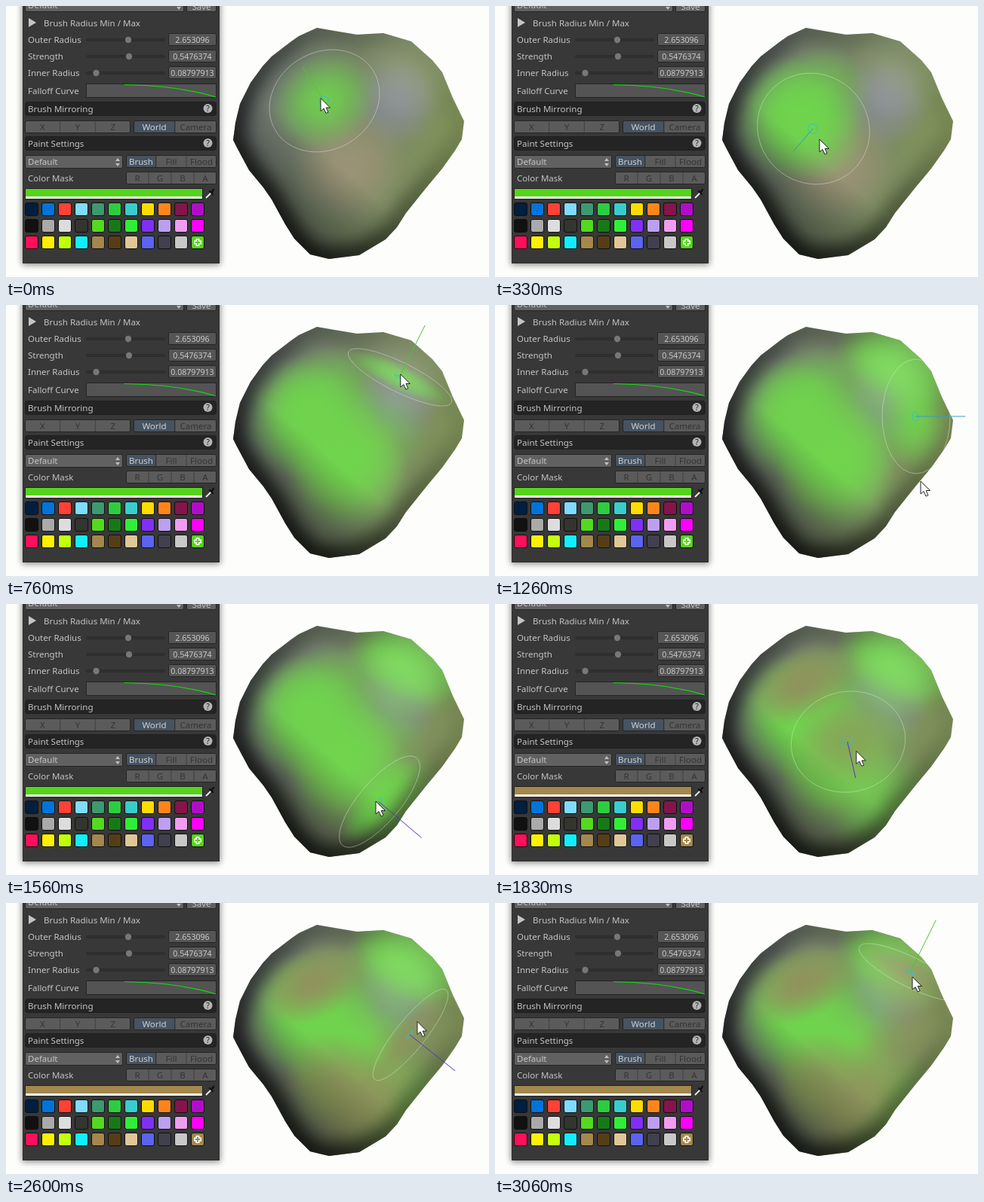
Recreate the animation shown at these times as an HTML page with a canvas. Size 640 by 360 pixels, loop 3100 ms.

```html
<!DOCTYPE html>
<html lang="en">
<head>
<meta charset="utf-8">
<title>Vertex painting</title>
<style>
html, body { margin: 0; width: 100%; height: 100%; overflow: hidden; background: #fdfdfc; }
svg, canvas { position: absolute; left: 0; top: 0; }
text { font-family: "Noto Sans", "Open Sans", sans-serif; }
</style>
</head>
<body>
<svg id="panel" width="640" height="360"></svg>
<canvas id="stage" width="640" height="360"></canvas>
<script>
const panel = document.getElementById('panel');
const ctx = document.getElementById('stage').getContext('2d');

// ---- Settings panel ----
const box = (x, y, w, h, fill, r = 2, stroke = '#252525') =>
  `<rect x="${x + .5}" y="${y + .5}" width="${w - 1}" height="${h - 1}" rx="${r}" fill="${fill}" stroke="${stroke}"/>`;
const text = (x, y, s, fill = '#c4c4c4', anchor = 'start', size = 11.5) =>
  `<text x="${x}" y="${y}" text-anchor="${anchor}" fill="${fill}" font-size="${size}">${s}</text>`;
const path = (d, attrs) => `<path d="${d}" ${attrs}/>`;

function tabs(x, y, w, names, active = -1) {
  const step = w / names.length;
  return box(x, y, w, 17, '#5b5b5b') + names.map((name, i) => {
    const left = x + i * step, on = i === active;
    return (on ? box(left, y, step, 17, '#465361') : '') +
      (i ? path(`M${left} ${y + 1}v15`, 'stroke="#414141"') : '') +
      text(left + step / 2, y + 12.5, name, on ? '#d0d0d0' : '#343434', 'middle');
  }).join('');
}

const header = (y, name) => box(25, y, 254, 19, '#242424', 3, '#202020') + text(29, y + 14, name) +
  `<circle cx="267.5" cy="${y + 9}" r="6" fill="#b4b4b4"/>` + text(267.5, y + 13, '?', '#222', 'middle', 10.5);

const slider = (y, name, knob, value) => text(29, y + 4, name) +
  box(106, y - 2, 105, 4, '#303030', 2, '#2c2c2c') + `<circle cx="${knob}" cy="${y}" r="4.2" fill="#777"/>` +
  box(215, y - 9, 64, 17, '#555') + text(247, y + 4, value, '#c8c8c8', 'middle', 10.6);

const dropdown = (x, y, w) => box(x, y, w, 18, '#616161') + text(x + 4, y + 13, 'Default') +
  path(`M${x + w - 10} ${y + 8}l3-4 3 4zm0 3l3 4 3-4z`, 'fill="#c0c0c0"');

const swatches = [
  '#001f3f #0074d9 #ff4136 #7fdbff #3d9970 #2ecc40 #39cccc #ffdc00 #ff851b #85144b #b10dc9',
  '#111 #aaa #ddd #33352f #55d820 #187818 #30ee38 #8030f5 #bd9ff0 #f09cf0 #f0f',
  '#ff0f5c #fff000 #c2ff0c #10efff #a3874d #553e17 #dfc797 #5b63f0 #40404f #c8c8c8 var(--paint)'
].map((row, j) => row.split(' ').map((c, i) => box(25 + 22 * i, 261 + 22 * j, 18, 18, c, 2.5, '#101010')).join('')).join('');

panel.innerHTML = `
<defs><filter id="soft" x="-10%" y="-10%" width="120%" height="120%"><feGaussianBlur stdDeviation="4"/></filter></defs>
<rect x="21" y="-10" width="263" height="354" opacity=".45" filter="url(#soft)"/>
${box(22, -5, 261, 347, '#383838', 0, '#2e2e2e')}
${dropdown(25, -10, 211)}
${box(239, -10, 40, 18, '#616161')}
${text(259, 5, 'Save', '#c4c4c4', 'middle')}
${path('M30 16l10 6-10 6z', 'fill="#c4c4c4"')}
${text(50, 26.5, 'Brush Radius Min / Max')}
${slider(45, 'Outer Radius', 162, '2.653096')}
${slider(67, 'Strength', 163, '0.5476374')}
${slider(89, 'Inner Radius', 119.5, '0.08797913')}
${text(29, 117, 'Falloff Curve')}
${box(106, 103, 173, 19, '#545454', 0)}
${path('M157 104.5C205 105 245 111 278 121', 'fill="none" stroke="#0be00b" stroke-width="1.2"')}
${header(127, 'Brush Mirroring')}
${tabs(25, 152, 140, ['X', 'Y', 'Z'])}
${tabs(169, 152, 110, ['World', 'Camera'], 0)}
${header(173, 'Paint Settings')}
${dropdown(25, 198, 130)}
${tabs(159, 198, 120, ['Brush', 'Fill', 'Flood'], 0)}
${text(29, 232.5, 'Color Mask')}
${tabs(159, 220, 120, ['R', 'G', 'B', 'A'])}
<rect x="25" y="242" width="236" height="15" fill="#222"/>
<rect x="26" y="243" width="234" height="10" fill="var(--paint)"/>
<rect x="26" y="253" width="234" height="3" fill="#fff"/>
${path('M265 255l7-7', 'stroke="#eee" stroke-width="1.8"')}
${path('M270 246l4 4M272 248l3-4', 'stroke="#111" stroke-width="2.4" stroke-linecap="round"')}
${swatches}
${path('M254 309v10M249 314h10', 'stroke="#fff" stroke-width="5"')}
${path('M254 310.5v7M250.5 314h7', 'stroke="var(--paint)" stroke-width="2"')}`;

// ---- Brush ----
// Each pass is a route of [step, x, y, paint left there].
const passes = [
  { swatch: '#55d41c', paint: '#6fd64c', preview: .85, route: [
    [0, 421, 126, .7], [4, 405, 112, .2], [7, 386, 150, .8], [10, 421, 163, .7], [13, 448, 205, .85],
    [16, 455, 232, .7], [20, 480, 175, .6], [23, 521, 96, .6], [28, 530, 76, .95], [33, 548, 82, .3],
    [38, 557, 148, 0], [39, 564, 234, 0], [43, 510, 265, .6], [48, 490, 262, 0]] },
  { swatch: '#a3874d', paint: '#91905d', preview: .65, route: [
    [51, 408, 105, .95], [55, 467, 183, 0], [60, 526, 245, 0], [66, 483, 275, .8], [71, 440, 242, .85],
    [76, 515, 210, .5], [80, 555, 140, .35], [83, 548, 95, .4], [92, 550, 92, 0], [93, 553, 98, 0]] }
];
const RADIUS = 76;
const clamp = (v, lo, hi) => Math.min(hi, Math.max(lo, v));

function locate(route, step) {
  const i = route.findIndex(k => k[0] > step);
  if (i < 0) return route[route.length - 1].slice(1, 3);
  const [s0, x0, y0] = route[i - 1], [s1, x1, y1] = route[i], k = (step - s0) / (s1 - s0);
  return [x0 + (x1 - x0) * k, y0 + (y1 - y0) * k];
}

// Projected surface normal of the rock, and the tilted disc lying on it
function surface(x, y) {
  const ny = clamp(2 * (y - 148), -69, 48);
  const reach = Math.sqrt(77 ** 2 - ny ** 2);
  const nx = clamp((x - 455) * (.65 + .007 * Math.abs(y - 148)), -reach, reach);
  return { nx, ny, squash: 1 - (Math.hypot(nx, ny) / 83) ** 4, tilt: Math.atan2(ny, nx) + Math.PI / 2 };
}

// ---- Rock ----
const outline = new Path2D('M412 29L435 33 465 38 500 36 537 47 565 72 578 88 592 122 607 153 604 177 595 192 ' +
  '578 216 558 240 530 275 518 294 503 310 468 331 428 336 403 330 382 309 370 290 352 257 341 241 ' +
  '322 218 306 188 301 178 304 155 310 130 324 102 340 80 352 67 378 47 388 40Z');

function blend(x0, y0, x1, y1, from, to) {
  const g = ctx.createLinearGradient(x0, y0, x1, y1);
  g.addColorStop(0, from);
  g.addColorStop(1, to);
  return g;
}

function flood(style) {
  ctx.fillStyle = style;
  ctx.fillRect(290, 20, 330, 325);
}

// Soft spot that falls off as a smooth bell
function dab(color, alpha, x, y, r, squash = 1, tilt = 0) {
  ctx.save();
  ctx.globalAlpha = alpha;
  ctx.translate(x, y);
  ctx.rotate(tilt);
  ctx.scale(r, r * squash);
  const g = ctx.createRadialGradient(0, 0, 0, 0, 0, 1);
  for (let i = 0; i <= 8; i++) {
    const a = Math.round(255 * (1 - (i / 8) ** 2) ** 1.4);
    g.addColorStop(i / 8, color + a.toString(16).padStart(2, '0'));
  }
  ctx.fillStyle = g;
  ctx.fillRect(-1, -1, 2, 2);
  ctx.restore();
}

function stone() {
  flood(blend(320, 130, 590, 170, '#6f7673', '#80935b'));
  dab('#8b8d99', .8, 515, 130, 62);
  dab('#a3967a', .8, 455, 212, 80);
}

function light() {
  flood(blend(350, 325, 445, 215, 'rgba(0,0,0,.55)', 'rgba(0,0,0,0)'));
  dab('#ffffff', .12, 535, 85, 70);
  ctx.save();
  ctx.filter = 'blur(11px)';
  ctx.lineWidth = 30;
  ctx.strokeStyle = blend(350, 260, 580, 90, 'rgba(0,0,0,.75)', 'rgba(0,0,0,.05)');
  ctx.stroke(outline);
  ctx.restore();
}

function paintUpTo(step) {
  for (const { paint, route } of passes) {
    for (const [start, x, y, amount] of route) {
      const { squash, tilt } = surface(x, y);
      const grown = clamp((step - start) / 3, 0, 1);
      if (grown * amount) dab(paint, grown * amount, x, y, RADIUS * 1.1, Math.max(.6, squash), tilt);
    }
  }
}

function ring(x, y, r, squash, tilt, color) {
  ctx.beginPath();
  ctx.ellipse(x, y, r, r * squash, tilt, 0, 7);
  ctx.strokeStyle = color;
  ctx.stroke();
}

const arrow = new Path2D('M0 0V17L4 13.5 7 20 10 18.7 7.2 12.5H12.5Z');

function draw(now) {
  // 30 steps a second, on a 10 ms clock
  const tick = Math.floor(now % 3100 / 10) * 10;
  const step = Math.min(92, Math.floor((tick + 9.9) * .03));
  const pass = passes[step < 51 ? 0 : 1];
  const [x, y] = locate(pass.route, step);
  const { nx, ny, squash, tilt } = surface(x, y);
  panel.style.setProperty('--paint', pass.swatch);

  ctx.clearRect(0, 0, 640, 360);
  ctx.save();
  ctx.clip(outline);
  stone();
  paintUpTo(step);
  dab(pass.paint, pass.preview, x, y, RADIUS, squash, tilt);
  light();
  ring(x + 1, y, RADIUS, squash, tilt, 'rgba(225,235,215,.45)');
  ctx.restore();

  ring(x, y, 6.5, squash, tilt, '#2cc4cc');
  ctx.beginPath();
  ctx.moveTo(x, y);
  ctx.lineTo(x + nx, y + ny);
  ctx.strokeStyle = `hsl(${195 + ny * 1.25 + Math.min(nx, 0) * 1.3} 60% 48%)`;
  ctx.stroke();

  // The pointer runs one step ahead of the brush
  ctx.save();
  ctx.translate(...locate(pass.route, step + 1));
  ctx.fillStyle = '#fff';
  ctx.strokeStyle = '#222';
  ctx.fill(arrow);
  ctx.stroke(arrow);
  ctx.restore();
}

const begin = performance.now();
function loop() {
  draw(performance.now() - begin);
  requestAnimationFrame(loop);
}
loop();
</script>
</body>
</html>
```
